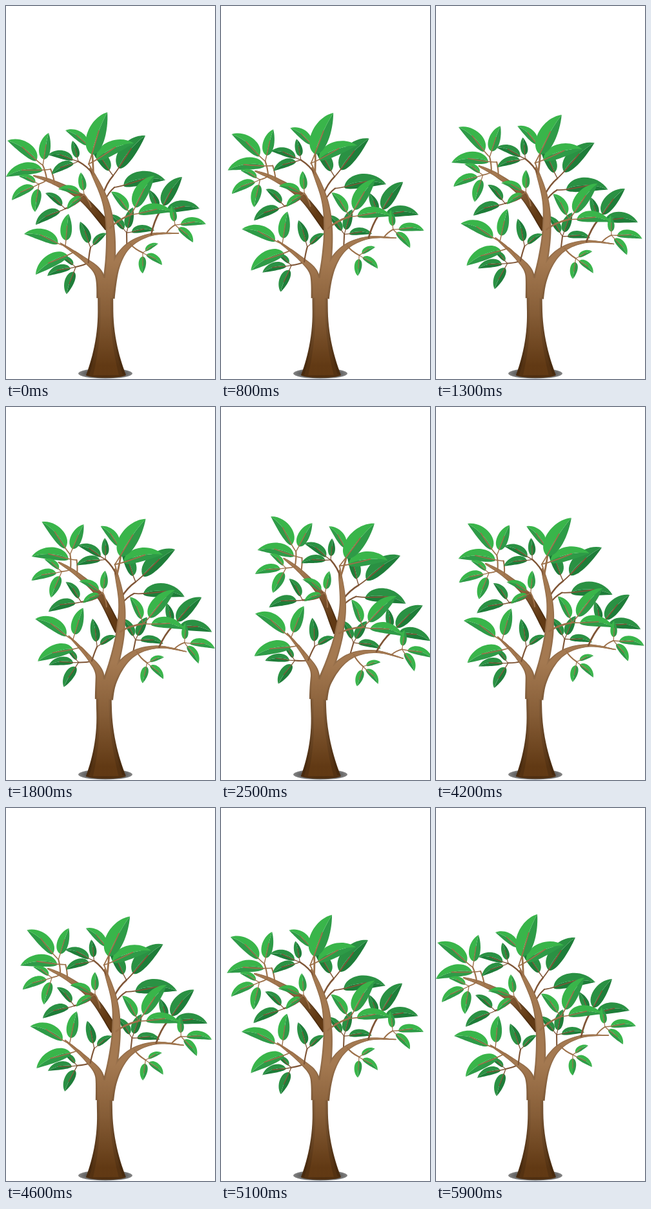
Recreate the animation shown at these times as an HTML page with a canvas. Size 324 px wide and 576 px high, loop 6000 ms.

```html
<!DOCTYPE html>
<html lang="en">
<head>
<meta charset="utf-8">
<title>Swaying tree</title>
<style>
  html, body { margin: 0; width: 100%; height: 100%; overflow: hidden; background: #fff; }
  canvas { display: block; width: 324px; height: 576px; }
</style>
</head>
<body>
<canvas id="stage"></canvas>
<script>
const canvas = document.getElementById('stage');
const ctx = canvas.getContext('2d');
const ratio = window.devicePixelRatio || 1;
canvas.width = 324 * ratio;
canvas.height = 576 * ratio;

const LOOP = 6000, STEP = 100, LEAD = 80;
const MAX_TURN = 17.8 * Math.PI / 180;
const BRIGHT = { lit: '#39b54a', shade: '#2e9b47', stem: '#9c7049' };
const DARK = { lit: '#2a9143', shade: '#1e7d39', stem: '#7f5536' };

let sway = 0;
const clamp = v => Math.max(0, Math.min(1, v));
const mix = (a, b, u) => [a[0] + (b[0] - a[0]) * u, a[1] + (b[1] - a[1]) * u];
const dist = (a, b) => Math.hypot(a[0] - b[0], a[1] - b[1]);

function turn([x, y], cx, cy, a) {
  const c = Math.cos(a), s = Math.sin(a), dx = x - cx, dy = y - cy;
  return [cx + dx * c - dy * s, cy + dx * s + dy * c];
}

// The crown turns about the fork, its upper left part a little more.
function warp(p, hold = 1) {
  const a = sway * MAX_TURN;
  const extra = clamp((345 - p[1]) / 20) * clamp((230 - p[0]) / 60);
  return turn(turn(p, 150, 320, a * 0.16 * extra), 150, 419, a * hold);
}

// The bend of the wood fades out below the fork.
const warpWood = p => warp(p, p[1] > 418 ? Math.exp((418 - p[1]) / 32) : 1);

function spline(keys, n = 10) {
  const last = keys.length - 1, out = [];
  for (let i = 0; i <= last * n; i++) {
    const k = Math.min(last - 1, Math.floor(i / n)), u = i / n - k;
    const q = [k - 1, k, k + 1, k + 2].map(j => keys[Math.max(0, Math.min(last, j))]);
    out.push([0, 1].map(d => {
      const [a, b, c, e] = q.map(p => p[d]);
      return b + u / 2 * (c - a + u * (2 * a - 5 * b + 4 * c - e + u * (3 * (b - c) + e - a)));
    }));
  }
  return out;
}

// A limb thins out from its root to its end.
function limb(width, power, ...keys) {
  const line = spline(keys);
  const widths = line.map((p, i) => width * (1 - i / (line.length - 1)) ** power + 1.5);
  return { line, widths };
}

const bough = limb(12, 0.7, [159, 342], [118, 297], [75, 273], [42, 262]);
const leftLimb = limb(18, 1, [150, 450], [144, 414], [122, 392], [84, 366]);
const mainLimb = limb(17, 0.5, [156, 450], [162, 390], [161, 338], [152, 296], [130, 250]);
const rightLimb = limb(20, 1.4, [158, 450], [169, 402], [190, 370], [225, 353], [268, 351]);
const trunk = { line: spline([[155, 570], [154, 420]], 24) };
trunk.widths = trunk.line.map(([, y]) => 24 + 38 * (Math.max(0, y - 470) / 100) ** 2);
const wood = [trunk, leftLimb, mainLimb, rightLimb];
const roots = [bough, leftLimb, mainLimb, rightLimb];

// A sprig grows from the nearest limb to a node, where its leaves fan out.
function sprig(tone, node, ...tips) {
  let best = Infinity, from;
  for (const { line } of roots) {
    line.forEach((p, i) => {
      const d = dist(p, node);
      if (d < best) [best, from] = [d, line[Math.max(0, i - 3)]];
    });
  }
  return { tone, node, tips, from };
}

const back = [
  sprig(DARK, [166, 262], [131, 219], [216, 200]),
  sprig(DARK, [168, 280], [247, 269]),
  sprig(DARK, [187, 350], [161, 322], [197, 311], [230, 347]),
  sprig(DARK, [108, 403], [85, 387], [64, 417], [94, 445])
];
const front = [
  sprig(BRIGHT, [57, 246], [2, 208], [66, 196]),
  sprig(BRIGHT, [69, 252], [0, 264]),
  sprig(BRIGHT, [51, 275], [20, 263], [9, 300], [45, 318]),
  sprig(DARK, [112, 240], [103, 208], [65, 230], [71, 260]),
  sprig(BRIGHT, [133, 220], [92, 192]),
  sprig(BRIGHT, [128, 244], [198, 212], [157, 164]),
  sprig(DARK, [92, 313], [61, 289], [46, 338]),
  sprig(BRIGHT, [121, 291], [116, 257], [81, 283], [95, 314]),
  sprig(BRIGHT, [92, 371], [97, 321], [28, 352]),
  sprig(BRIGHT, [107, 379], [46, 415]),
  sprig(DARK, [131, 373], [115, 333], [156, 351]),
  sprig(DARK, [238, 318], [222, 284], [273, 264], [300, 313]),
  sprig(BRIGHT, [262, 338], [257, 308], [310, 337], [290, 365]),
  sprig(BRIGHT, [194, 322], [163, 287], [257, 318], [230, 262]),
  sprig(BRIGHT, [212, 381], [236, 367], [242, 400], [212, 413])
];

function strokeCurve(a, c, b, width) {
  ctx.lineWidth = width;
  ctx.beginPath();
  ctx.moveTo(...a);
  ctx.quadraticCurveTo(...c, ...b);
  ctx.stroke();
}

function drawLeaf(node, tip, tone) {
  const base = mix(node, tip, 0.18);
  const [dx, dy] = [tip[0] - base[0], tip[1] - base[1]];
  const len = Math.hypot(dx, dy);
  const flat = Math.abs(dx) / len;
  const width = len * (0.45 - 0.11 * flat);
  const bend = -0.13 * dx;                 // level leaves arch upwards
  const lit = 1.5 * dx < dy ? 1 : -1;      // upper left half catches the light
  const at = (u, off) => warp([base[0] + dx * u - dy / len * off, base[1] + dy * u + dx / len * off]);
  const rib = [at(0.1, bend), at(0.66, bend * 1.25)];
  const [foot, end] = [at(0, 0), at(1, 0)];
  const half = (colour, near, far) => {
    ctx.fillStyle = colour;
    ctx.beginPath();
    ctx.moveTo(...foot);
    ctx.bezierCurveTo(...near, ...far, ...end);
    ctx.bezierCurveTo(...rib[1], ...rib[0], ...foot);
    ctx.fill();
  };
  half(tone.shade, at(0.08, bend - lit * width * 0.64), at(0.62, bend * 1.25 - lit * width * 0.54));
  half(tone.lit, at(0.06, bend + lit * width * 0.72), at(0.74, bend * 1.25 + lit * width * 0.72));
  ctx.strokeStyle = tone.stem;
  strokeCurve(warp(node), foot, at(0.55, bend * 0.85), 0.8 + len / 70);
}

function drawSprig({ tone, node, tips, from }) {
  tips.forEach(tip => drawLeaf(node, tip, tone));
  const reach = dist(from, node);
  const bow = [mix(from, node, 0.5)[0] + (from[0] - node[0]) * 0.15, mix(from, node, 0.6)[1]];
  strokeCurve(warp(from), warp(bow), warp(node), 1.2 + reach / 25);
}

function fillLimb({ line, widths }, scale) {
  const pts = line.map(warpWood), one = [], two = [];
  pts.forEach(([x, y], i) => {
    const a = pts[Math.max(0, i - 1)], b = pts[Math.min(pts.length - 1, i + 1)];
    const h = widths[i] * scale / 2 / dist(a, b);
    const ox = (a[1] - b[1]) * h, oy = (b[0] - a[0]) * h;
    one.push([x + ox, y + oy]);
    two.unshift([x - ox, y - oy]);
  });
  ctx.beginPath();
  one.concat(two).forEach(p => ctx.lineTo(...p));
  ctx.fill();
}

// Bark runs from light to dark, with a darker rim.
function bark(from, to, rim) {
  const g = ctx.createLinearGradient(...from, ...to);
  [[34, 48], [42, 37], [66, 23]].forEach(([s, l], i) => {
    g.addColorStop(i / 2, `hsl(29 ${s}% ${l - rim}%)`);
  });
  return g;
}

function drawWood(limbs, from, to) {
  [[1, 6], [0.84, 3], [0.64, 0]].forEach(([scale, rim]) => {
    ctx.fillStyle = bark(from, to, rim);
    limbs.forEach(l => fillLimb(l, scale));
  });
}

function drawFoot() {
  const g = ctx.createRadialGradient(0, 0, 20, 0, 0, 42);
  g.addColorStop(0, '#3c3c3c');
  g.addColorStop(1, '#858585');
  ctx.save();
  ctx.translate(154, 567.5);
  ctx.scale(1, 0.19);
  ctx.fillStyle = g;
  ctx.beginPath();
  ctx.arc(0, 0, 42, 0, Math.PI * 2);
  ctx.fill();
  ctx.restore();
  ctx.fillStyle = bark([0, 395], [0, 555], 4);
  ctx.beginPath();
  ctx.ellipse(155, 569.5, 31, 4.5, 0, 0, Math.PI);
  ctx.fill();
}

function draw(now) {
  const t = Math.floor(now % LOOP / STEP) * STEP;
  sway = (1 - Math.cos((t + LEAD) / LOOP * 2 * Math.PI)) / 2;
  ctx.setTransform(ratio, 0, 0, ratio, 0, 0);
  ctx.fillStyle = '#fff';
  ctx.fillRect(0, 0, 324, 576);
  ctx.lineCap = 'round';
  drawFoot();
  back.forEach(drawSprig);
  drawWood([bough], warp([75, 273]), warp([145, 320]));
  drawWood(wood, [0, 395], [0, 555]);
  front.forEach(drawSprig);
  requestAnimationFrame(draw);
}
requestAnimationFrame(draw);
</script>
</body>
</html>
```
